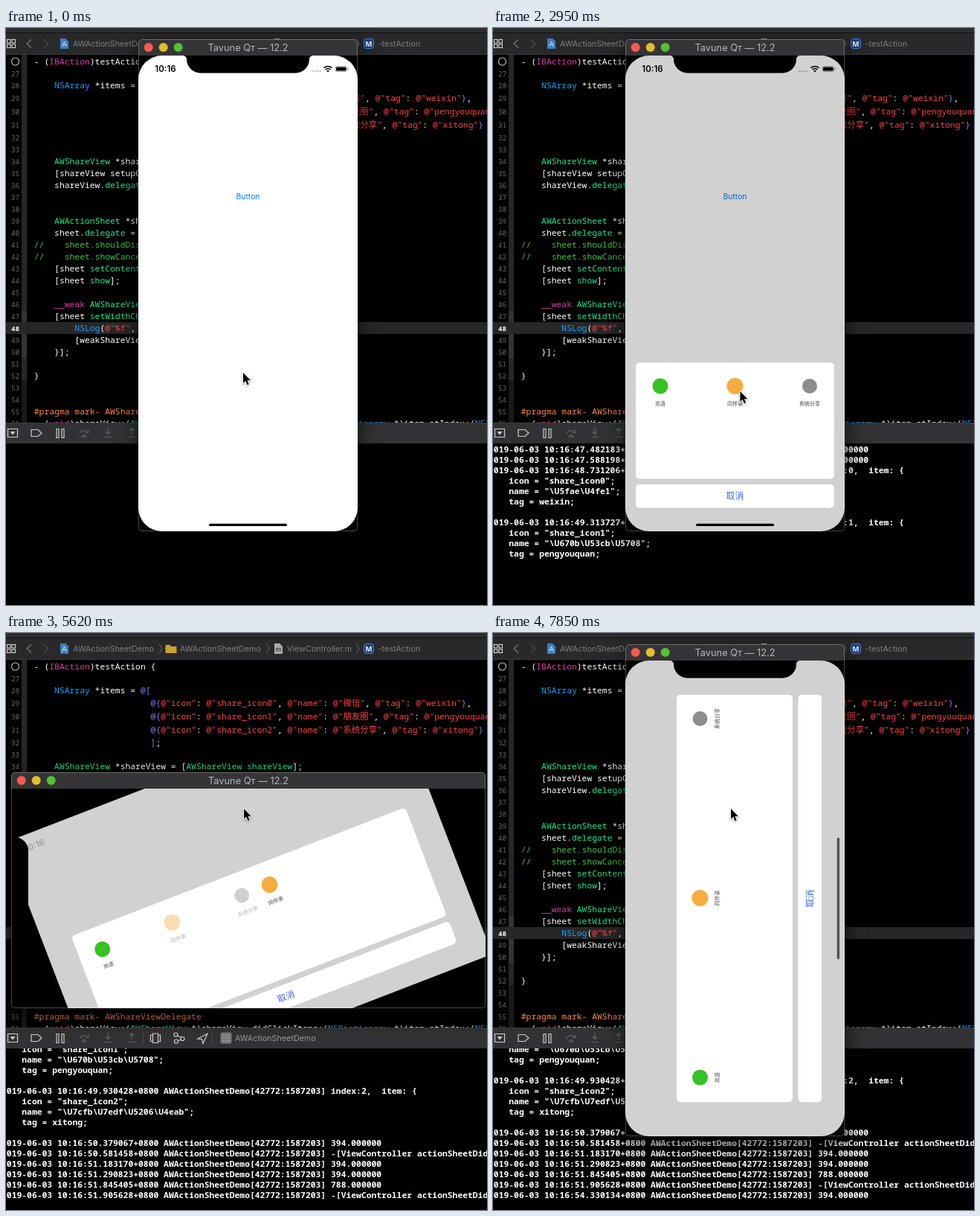
Animation, 647 px wide and 775 px high, one loop 7.99 s. Source, as an HTML page with a canvas:

```html
<!DOCTYPE html>
<html lang="en">
<head>
<meta charset="utf-8">
<title>Share sheet rotation</title>
<style>
html, body { margin: 0; width: 100%; height: 100%; overflow: hidden; background: #000; }
canvas { display: block; width: 647px; height: 775px; }
</style>
</head>
<body>
<canvas id="stage" width="647" height="775"></canvas>
<script>
const LOOP = 7990, W = 647, H = 775;
const stage = document.getElementById('stage');
let c = stage.getContext('2d');
const MONO = '"Noto Sans Mono", "Noto Sans CJK SC", monospace';
const SANS = 'Inter, "Noto Sans", sans-serif';
const CJK = '"Noto Sans CJK SC", "Noto Sans CJK", sans-serif';

// ---------- helpers ----------
const clamp = v => Math.max(0, Math.min(1, v));
const mix = (a, b, p) => a + (b - a) * p;
const rad = d => d * Math.PI / 180;
function ease(t, start, dur) {
  const u = clamp((t - start) / dur);
  return u < .5 ? 2 * u * u : 1 - 2 * (1 - u) * (1 - u);
}
function text(s, x, y, font, color, align = 'left') {
  c.font = font;
  c.fillStyle = color;
  c.textAlign = align;
  c.fillText(s, x, y);
}
function rect(x, y, w, h, color) {
  c.fillStyle = color;
  c.fillRect(x, y, w, h);
}
function round(x, y, w, h, r) {
  c.beginPath();
  c.roundRect(x, y, w, h, r);
}
function dot(x, y, r, color) {
  c.beginPath();
  c.arc(x, y, r, 0, 7);
  c.fillStyle = color;
  c.fill();
}
function stroke(path, color, width = 1.2) {
  c.strokeStyle = color;
  c.lineWidth = width;
  c.stroke(new Path2D(path));
}
function fill(path, color) {
  c.fillStyle = color;
  c.fill(new Path2D(path));
}

// ---------- editor ----------
const pad = ' '.repeat(23);
const item = (i, name, tag, end) =>
  `${pad}@{@"icon": @"share_icon${i}", @"name": @"${name}", @"tag": @"${tag}"}${end}`;
const code = [
  '- (IBAction)testAction {', '',
  '    NSArray *items = @[',
  item(0, '微信', 'weixin', ','),
  item(1, '朋友圈', 'pengyouquan', ','),
  item(2, '系统分享', 'xitong', ''),
  pad + '];', '',
  '    AWShareView *shareView = [AWShareView shareView];',
  '    [shareView setupContentWithItems:items];',
  '    shareView.delegate = self;', '', '',
  '    AWActionSheet *sheet = [AWActionSheet sheet];',
  '    sheet.delegate = self;',
  '//    sheet.shouldDismiss = NO;',
  '//    sheet.showCancel = NO;',
  '    [sheet setContentView:shareView];',
  '    [sheet show];', '',
  '    __weak AWShareView *weakShareView = shareView;',
  '    [sheet setWidthChanged:^(CGFloat width) {',
  '        NSLog(@"%f", width);',
  '        [weakShareView setWidth:width];',
  '    }];', '', '}', '', '',
  '#pragma mark- AWShareViewDelegate',
  '- (void)shareView:(AWShareView *)shareView didClickItems:(NSDictionary *)item atIndex:(NSInteger)index {'
];
const rules = [
  [/^\/\/.*/, '#3cc642'],
  [/^#pragma.*/, '#ff8a4c'],
  [/@"[^"]*"/, '#ff4143'],
  [/\b(?:IBAction|void|__weak|self|NO)\b/, '#dd3ca6'],
  [/\b(?:NS\w+|CGFloat)/, '#12a2f8'],
  [/\b(?:AWShareView|AWActionSheet|set[A-Z]\w+|show|delegate)\b|(?<=\[AW\w+ )\w+/, '#17ea92'],
  [/@[\[{]|(?<=")\}|(?<=^ {9,})\]/, '#8078f5']
];
const lexer = new RegExp(rules.map(r => `(${r[0].source})`).join('|'), 'g');

function codeLine(s, x, y) {
  const font = `500 11.37px ${MONO}`;
  let at = 0;
  const put = (part, color) => {
    text(part, x, y, font, color);
    x += c.measureText(part).width;
  };
  for (const m of s.matchAll(lexer)) {
    put(s.slice(at, m.index), '#fff');
    put(m[0], rules[m.slice(1).findIndex(g => g !== undefined)][1]);
    at = m.index + m[0].length;
  }
  put(s.slice(at), '#fff');
}

// lines with Chinese text are 18 high, the others 16
function rowY(i) {
  if (i < 3) return 45 + 16 * i;
  return i < 6 ? 94 + 18 * (i - 3) : 147 + 16 * (i - 6);
}

function drawEditor() {
  rect(0, 0, W, H, '#000');
  rect(21, 36, 7, 494, '#19191b');
  rect(21, 36, 7, 437, '#272729');
  rect(21, 380, 7, 63, '#343436');
  rect(0, 395, W, 16, '#272728');
  code.forEach((s, i) => {
    const y = rowY(i), on = i === 22;
    if (i) text(26 + i, 18, y + 3.5, `${on ? 700 : 400} 9.2px ${MONO}`, on ? '#fff' : '#686a6e', 'right');
    codeLine(s, 37.8, y + 4);
  });
  c.beginPath();
  c.arc(12.5, 45, 5, 0, 7);
  c.strokeStyle = '#c8c8c8';
  c.lineWidth = 1.1;
  c.stroke();
}

function drawPathBar() {
  rect(0, 0, W, 36, '#29292b');
  rect(0, 0, W, 6, '#2e2e30');
  rect(0, 6, W, 1, '#111');
  rect(0, 35, W, 1, '#3a3a3c');
  for (let i = 0; i < 4; i++) {
    c.strokeStyle = '#d5d5d5';
    c.lineWidth = 1.1;
    c.strokeRect(1.5 + (i % 2) * 6.5, 15.5 + (i >> 1) * 6.5, 4.5, 4.5);
  }
  stroke('M34 15.5L28 21L34 26.5', '#77777a', 1.3);
  stroke('M51 15.5L57 21L51 26.5', '#4a4a4c', 1.3);
  const font = `400 10.8px ${SANS}`, gray = '#7f7f83';
  [206, 350, 471].forEach(x => stroke(`M${x} 14.5l4 6.5l-4 6.5`, '#66666a', 1));
  fill('M73 14h7l4 4v10h-11z', '#3b7fc4');
  stroke('M75.5 25l3-7l3 7M76.5 22.5h4', '#cfe4fa', 1);
  text('AWActionSheetDemo', 90, 25, font, gray);
  fill('M214.500 16h6l1.500 2h7.500v9h-15z', '#c9a032');
  text('AWActionSheetDemo', 234, 25, font, gray);
  fill('M361 14h7l4 4v10h-11z', '#a9a9ab');
  text('m', 366.5, 25, `700 8px ${SANS}`, '#444', 'center');
  text('ViewController.m', 378, 25, font, gray);
  round(481.5, 14.5, 13, 13, 3);
  c.fillStyle = '#1d3f78';
  c.fill();
  c.strokeStyle = '#4a7fcf';
  c.lineWidth = 1;
  c.stroke();
  text('M', 488, 24.6, `700 9.5px ${SANS}`, '#e4ecfa', 'center');
  text('-testAction', 500.5, 25, font, gray);
}

function drawDebugBar() {
  rect(0, 530, W, 28, '#323234');
  rect(0, 530, W, 1, '#3d3d3f');
  const on = '#cfcfd1', off = '#626265';
  stroke('M2.500 538.500h13v11h-13z', on);
  fill('M5.500 542h7l-3.500 4.500z', on);
  stroke('M34 539.500h9l5 4.500l-5 4.500h-9z', on);
  stroke('M68 538.500h3v12h-3zM75 538.500h3v12h-3z', on);
  stroke('M99 545a6 5 0 0 1 11-2M111 539.500v4h-4M102 549l3-3l3 3z', off);
  stroke('M137 537v8M134 542l3 3.500l3-3.500M132 549.500h10', off);
  stroke('M169 546v-8M166 541l3-3.500l3 3.500M164 549.500h10', off);
  stroke('M184.500 536v16M276.500 536v16', '#4b4b4e', 1);
  stroke('M197.500 538h7v12.500h-7zM197 540h-2.500v8.500h2.500M205 540h2.500v8.500h-2.500', on);
  stroke('M231 541l5 2.500M231 547.500l5 -1', on);
  [[228.5, 539.5], [237.5, 545], [229, 548.5]].forEach(([x, y]) => {
    c.beginPath();
    c.arc(x, y, 2.5, 0, 7);
    c.stroke();
  });
  stroke('M258 545l13-7l-6 13.500l-1.500-6z', on);
  round(288.5, 536.5, 15, 15, 3);
  c.fillStyle = '#77777a';
  c.fill();
  stroke('M292.500 537v14M296 537v14M299.500 537v14M289 540.500h14M289 544h14M289 547.500h14', '#929295', .7);
  text('AWActionSheetDemo', 308, 548, `400 10.8px ${SANS}`, '#98989b');
}

// ---------- console ----------
const log = [];
function print(stamp, msg, ...more) {
  const t = (stamp - 46.481) * 1000;
  const head = `2019-06-03 10:16:${stamp}+0800 AWActionSheetDemo[42772:1587203] ${msg}`;
  [head, ...more].forEach(s => log.push({ t, s }));
}
const printItem = (stamp, i, name, tag) => print(stamp, `index:${i},  item: {`,
  `    icon = "share_icon${i}";`, `    name = "${name}";`, `    tag = ${tag};`, '}');
print('47.482183', '394.000000');
print('47.588198', '394.000000');
printItem('48.731206', 0, '\\U5fae\\U4fe1', 'weixin');
printItem('49.313727', 1, '\\U670b\\U53cb\\U5708', 'pengyouquan');
printItem('49.930428', 2, '\\U7cfb\\U7edf\\U5206\\U4eab', 'xitong');
print('50.379067', '394.000000');
print('50.581458', '-[ViewController actionSheetDidHide:]');
print('51.183170', '394.000000');
print('51.290823', '394.000000');
print('51.845405', '788.000000');
print('51.905628', '-[ViewController actionSheetDidShow:]');
print('54.330134', '394.000000');

function drawConsole(t) {
  const lines = log.filter(l => l.t <= t);
  const scroll = Math.max(0, 14 * (lines.length - 1) - 189);
  c.save();
  c.beginPath();
  c.rect(0, 558, W, H - 558);
  c.clip();
  lines.forEach((l, i) => {
    const y = 566 + 14 * i - scroll;
    if (y > 545) text(l.s, -6, y + 4, `700 11.37px ${MONO}`, '#fff');
  });
  c.restore();
}

// ---------- phone ----------
const clicks = [[900, 1040], [2200, 2330], [2760, 2870], [3380, 3490], [3880, 4020], [4600, 4740]];

function sheetState(t) {
  if (t >= 3938 && t < 4650) {
    const e = ease(t, 3938, 200);
    return { drop: 226 * e, dim: 1 - e };
  }
  const start = t < 3938 ? 950 : 4650;
  return { drop: 226 * (1 - ease(t, start, 250)), dim: clamp((t - start) / 60) };
}

// device angle, interface angle, and how far the layout is landscape
function pose(t) {
  if (t < 5170) return { dev: 0, ui: 0, p: 0 };
  if (t < 6520) {
    const p = ease(t, 5394, 345);
    return { dev: -90, ui: -90 * (1 - p), p };
  }
  if (t < 7110) return { dev: 180, ui: -90, p: 1 };
  if (t < 7850) return { dev: 90, ui: -180 * (1 - ease(t, 7200, 560)), p: 1 };
  return { dev: 0, ui: -90, p: 1 };
}

function drawStatus(w, alpha) {
  if (alpha <= 0) return;
  c.save();
  c.globalAlpha = alpha;
  text('10:16', 36.5, 22, `600 11.5px ${SANS}`, '#000', 'center');
  c.translate(w - 295, 0);
  for (let i = 0; i < 4; i++) rect(233 + i * 3.5, 20, 2.4, 1.8, 'rgba(0,0,0,.25)');
  stroke('M249.600 16.600a7.800 7.800 0 0 1 10.800 0M251.600 18.900a5 5 0 0 1 6.800 0', '#000', 1.6);
  fill('M253.200 20.600a2.600 2.600 0 0 1 3.600 0l-1.800 1.900z', '#000');
  round(265, 14.5, 15.5, 7, 2);
  c.strokeStyle = 'rgba(0,0,0,.4)';
  c.lineWidth = .8;
  c.stroke();
  round(266, 15.5, 13.5, 5, 1.2);
  c.fillStyle = '#000';
  c.fill();
  rect(281.5, 16.7, 1, 2.6, 'rgba(0,0,0,.5)');
  c.restore();
}

const cells = [['岚语', '#34c322', 10.5], ['同伴录', '#f6ac3f', 11], ['系统分享', '#8d8d8d', 10]];
function drawCell(i, x, y, alpha) {
  const [label, color, r] = cells[i];
  c.globalAlpha = alpha;
  dot(x, y, r, color);
  text(label, x, y + 25.5, `400 7px ${CJK}`, '#444', 'center');
  c.globalAlpha = 1;
}

function drawSheet(w, p, drop) {
  const x = mix(14, 46, p), y = mix(412.5, 69, p) + drop, pw = w - 2 * x;
  c.save();
  round(x, y, pw, 156, 5);
  c.fillStyle = '#fff';
  c.fill();
  c.clip();
  drawCell(0, x + 33, y + 31.5, 1);
  for (let i = 1; i < 3; i++) {
    if (p < 1) drawCell(i, x + 33 + 100.5 * i, y + 31.5, 1 - p * p);
    if (p > 0) drawCell(i, x + 33 + 241 * i, y + 31.5, Math.min(1, 2 * p));
  }
  c.restore();
  round(x, y + 163.5, pw, 31.5, 5);
  c.fillStyle = '#fff';
  c.fill();
  text('取消', w / 2, y + 183.8, `400 12px ${CJK}`, '#3f67f0', 'center');
}

function drawUI(t, w, h, p) {
  const s = sheetState(t);
  rect(0, 0, w, h, '#fff');
  c.globalAlpha = [clicks[0], clicks[5]].reduce((a, [from, to]) =>
    t < from ? a : Math.min(a, mix(.2, 1, clamp((t - to) / 200))), 1);
  text('Button', w / 2, 193, `400 10.4px ${SANS}`, '#007aff', 'center');
  c.globalAlpha = 1;
  rect(0, 0, w, h, `rgba(0,0,0,${.18 * s.dim})`);
  drawStatus(w, 1 - p);
  if (s.drop < 226) drawSheet(w, p, s.drop);
  // the home bar fades away in the middle of a turn
  const bar = mix(105, 163.5, p);
  c.globalAlpha = clamp(8 * Math.abs(p - .5) - 3);
  round((w - bar) / 2, h - 10.3, bar, 3.4, 1.7);
  c.fillStyle = t >= 7850 ? '#555' : '#000';
  c.fill();
  c.globalAlpha = 1;
}

function drawWindow(t) {
  const { dev, ui, p } = pose(t);
  const wide = Math.abs(dev) === 90;
  const [x, y, w, h] = wide ? [7, 187, 638, 317] : [178, 15, 295, 661];
  const corners = [5, 5, 4, 4];

  c.save();
  c.shadowColor = 'rgba(0,0,0,.72)';
  c.shadowBlur = 29;
  c.shadowOffsetY = 9;
  round(x, y, w, h, corners);
  c.fillStyle = '#000';
  c.fill();
  c.restore();

  c.save();
  round(x, y, w, h, corners);
  c.clip();
  rect(x, y, w, 22, '#353537');
  ['#fa5a51', '#e6bd2b', '#56bf34'].forEach((col, i) => dot(x + 13.7 + 20 * i, y + 11, 6, col));
  text('Tavune Qᴛ — 12.2', x + w / 2, y + 15.7, `400 12.8px ${SANS}`, '#b6b6b8', 'center');

  c.beginPath();
  c.rect(x, y + 22, w, h - 22);
  c.clip();
  c.translate(x + w / 2, 356.5);
  c.save();
  c.rotate(rad(dev));
  round(-147.5, -319.5, 295, 639, 32);
  c.clip();
  c.rotate(rad(ui - dev));
  const uw = mix(295, 639, p), uh = mix(639, 295, p);
  c.translate(-uw / 2, -uh / 2);
  drawUI(t, uw, uh, p);
  c.restore();
  c.rotate(rad(dev));
  fill('M-87.500 -320.500v1a5 5 0 0 1 5 5a18.500 18.500 0 0 0 18.500 18.500h128' +
    'a18.500 18.500 0 0 0 18.500 -18.500a5 5 0 0 1 5 -5v-1z', '#000');
  c.restore();

  round(x + .5, y + .5, w - 1, h - 1, corners);
  c.strokeStyle = 'rgba(255,255,255,.27)';
  c.lineWidth = 1;
  c.stroke();
}

// ---------- pointer ----------
const track = [
  [0, 319, 463], [400, 319, 463], [860, 323, 229], [1480, 323, 229], [1630, 335, 295],
  [2170, 226, 487], [2340, 226, 487], [2730, 326, 488], [2880, 326, 488],
  [3340, 426, 487], [3490, 426, 487], [3830, 355, 394], [4080, 355, 394],
  [4560, 320, 236], [LOOP, 320, 236]
];
function drawPointer(t) {
  const i = track.findIndex(k => k[0] > t);
  const [t0, x0, y0] = track[i - 1], [t1, x1, y1] = track[i];
  const u = (t - t0) / (t1 - t0), e = u * u * (3 - 2 * u);
  const x = mix(x0, x1, e), y = mix(y0, y1, e);
  if (clicks.some(([from, to]) => t >= from && t < to)) {
    c.beginPath();
    c.arc(x + 1.3, y, 10, 0, 7);
    c.strokeStyle = 'rgba(255,255,255,.7)';
    c.lineWidth = 2.6;
    c.stroke();
    c.strokeStyle = '#111';
    c.lineWidth = 1.2;
    c.stroke();
  }
  const arrow = 'M0 0V14L3.200 11L5.500 16.400L7.800 15.400L5.500 10.200H10Z';
  c.save();
  c.translate(x, y);
  c.lineJoin = 'round';
  c.shadowColor = 'rgba(0,0,0,.35)';
  c.shadowBlur = 3;
  c.shadowOffsetY = 1;
  stroke(arrow, '#fff', 2);
  c.shadowColor = 'transparent';
  fill(arrow, '#000');
  c.restore();
}

// ---------- run ----------
const back = document.createElement('canvas');
back.width = W;
back.height = H;
const front = c;
c = back.getContext('2d');
drawEditor();
drawPathBar();
drawDebugBar();
rect(0, 558, W, H - 558, '#000');
c = front;

const begin = performance.now();
function frame() {
  const t = (performance.now() - begin) % LOOP;
  c.drawImage(back, 0, 0);
  drawConsole(t);
  drawWindow(t);
  drawPointer(t);
  requestAnimationFrame(frame);
}
frame();
</script>
</body>
</html>
```
